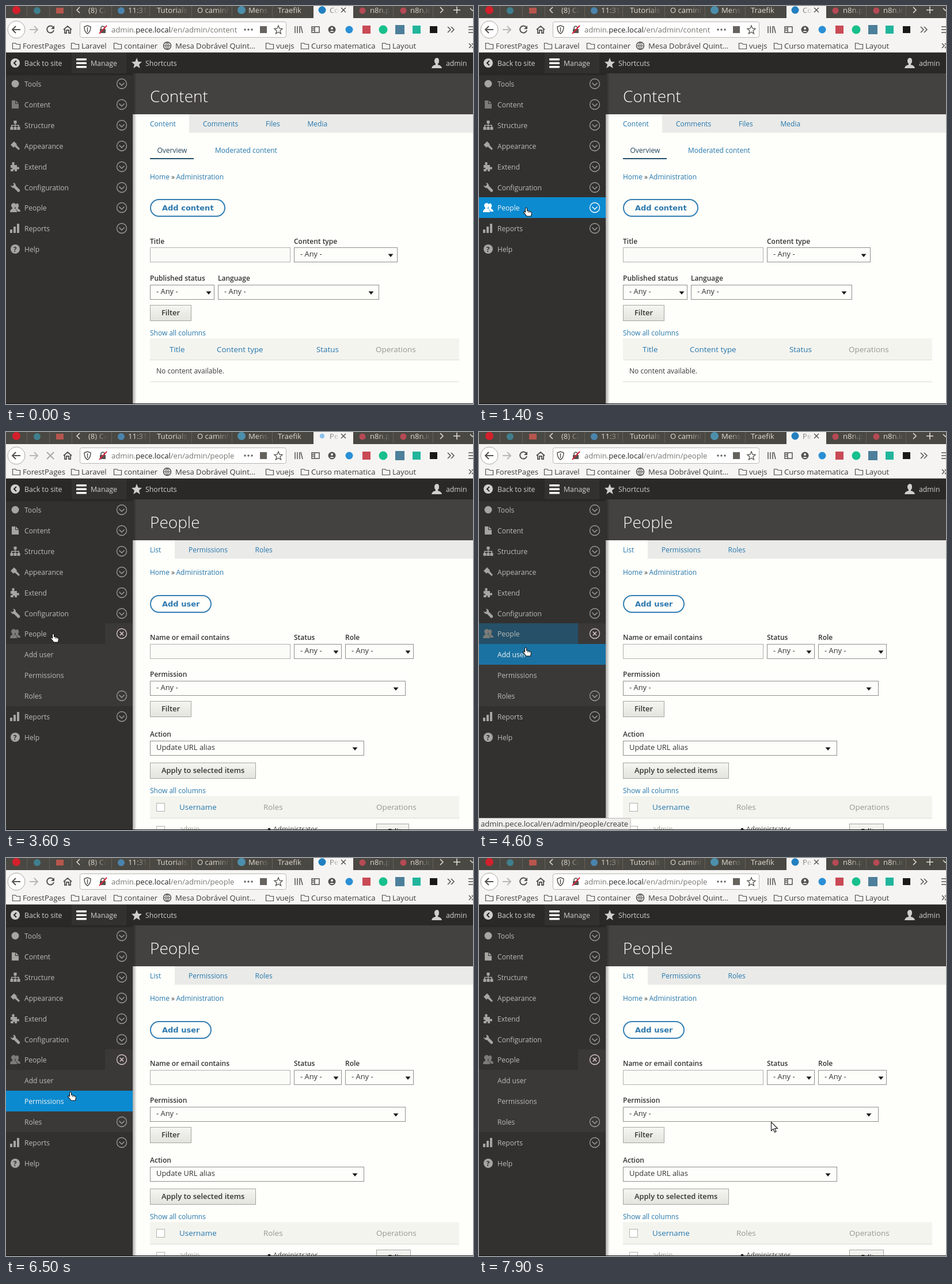
Animation, 811 px wide and 691 px high, one loop 8000 ms. Source, as an HTML page:

```html
<!DOCTYPE html>
<html lang="en">
<head>
<meta charset="utf-8">
<title>Admin menu walk-through</title>
<style>
html, body { margin: 0; width: 100%; height: 100%; overflow: hidden; background: #fefefa; }
svg { display: block; width: 811px; height: 691px; }
text { font: 12px "Open Sans", "Noto Sans", sans-serif; fill: #3a3a38; white-space: pre; }
.ui { font-size: 13.1px; fill: #3d3c39; }
.tab { font-size: 13.1px; fill: #dfdbd2; }
.bar { font-size: 12.3px; fill: #d0d0cc; }
.h1 { font-size: 28px; font-weight: 300; fill: #fff; }
.link { fill: #2577ad; }
.now { fill: #21445c; }
.label { font-weight: 600; fill: #333331; }
.btn { font-size: 12.9px; font-weight: 600; fill: #333331; }
.opt { font-size: 12.9px; fill: #333331; }
.th { font-size: 13.4px; }
.dim { fill: #969692; }
.pill { font: bold 13px "DejaVu Sans", sans-serif; fill: #2c78af; }
.row text { font-size: 12.1px; fill: #bbbbb7; }
.row .ico { color: #a5a5a1; }
.row .ico.here { color: #7b7b78; }
.row .arrow { color: #9c9c98; }
.row.hot .ico, .row.hot .arrow { color: #fff; }
.row.hot text { fill: #f4f4f2; }
.line { fill: none; stroke: currentColor; stroke-width: 1.5; }
.nav { color: #55534f; }
</style>
</head>
<body>
<svg id="stage" viewBox="0 0 811 691" xmlns="http://www.w3.org/2000/svg"></svg>
<script>
const LOOP = 8000, STEP = 100;
const MENU_TOP = 117, ROW = 35.9;
const stage = document.getElementById('stage');

// Markup helpers
const text = (x, y, s, cls = '') => `<text x="${x}" y="${y}" class="${cls}">${s}</text>`;
const rect = (x, y, w, h, fill, more = '') => `<rect x="${x}" y="${y}" width="${w}" height="${h}" fill="${fill}" ${more}/>`;
const dot = (x, y, r, fill, more = '') => `<circle cx="${x}" cy="${y}" r="${r}" fill="${fill}" ${more}/>`;
const line = (d, more = '') => `<path class="line" d="${d}" ${more}/>`;
const shape = (d, fill = 'currentColor', more = '') => `<path d="${d}" fill="${fill}" ${more}/>`;
const at = (x, y, s, more = '') => `<g transform="translate(${x} ${y})" ${more}>${s}</g>`;
const frame = (x, y, w, h, fill, stroke, more = '') =>
  rect(x + .5, y + .5, w - 1, h - 1, fill, `stroke="${stroke}" ${more}`);

// Form parts
const field = (x, y, w) => frame(x, y, w, 26, '#fbfbf7', '#b1b1ac');
const select = (x, y, w, tip, s = '- Any -') => frame(x, y, w, 26, '#fdfdf9', '#8f8f8b') +
  text(x + 11, y + 16, s, 'opt') + shape(`M${tip - 4.5} ${y + 11.5}h9l-4.5 5.5z`, '#1b1b1a');
const button = (x, y, w, s) => frame(x, y, w, 28, 'url(#btn)', '#a5a5a0') + text(x + 20, y + 18, s, 'btn');
const pill = (y, w, s) => rect(251, y + 1, w - 2, 29, '#fefefa', 'rx="14.5" stroke="#347fb4" stroke-width="2"') +
  text(271, y + 20, s, 'pill');
const box = (x, y) => frame(x, y, 15, 15, '#fff', '#b1b1ac');
const crumbs = y => text(250, y, 'Home', 'link') + text(287, y, '»') + text(295.5, y, 'Administration', 'link');
const header = (title, tabEnd, tabs) =>
  rect(220, MENU_TOP, 591, 71, '#444240') + text(250, 167, title, 'h1') +
  rect(tabEnd, 188, 811 - tabEnd, 32, '#eaeae8') +
  tabs.map(([x, s]) => text(x, 209, s, 'link')).join('');

// Sidebar icons, centred on 0,0
const icons = {
  Tools: dot(0, 0, 6.5, 'currentColor'),
  Content: shape('M-6-7h6v6h6v8h-12zM1-7l5 5h-5z'),
  Structure: shape('M-2.5-8h5v5h-1.8v2.5h6.3v3.5h1.5v5h-5v-5h1.8v-2h-4.6v2h1.8v5h-5v-5h1.8v-2h-4.6v2h1.8v5h-5v-5h1.5v-3.5h6.3v-2.5h-1.8z'),
  Appearance: shape('M-8-2l6-6 5 5-1 1 6 7-2 2-7-6-2 2z'),
  Extend: shape('M-8-3h3q-2-5 1.5-5t1.5 5h5v4q4-2 4 1.5t-4 1.5v4h-4q1-3-1-3t-1 3h-5v-4q3 1 3-1t-3-1z'),
  Configuration: shape('M-4-8q5 0 5 5l7 7q1 4-3 4l-7-7q-5 0-6-5l3 2 3-3z'),
  People: shape('M2-7q3-1 4 2t-1 5v2q4 1 4 5h-5q-1-4-4-5 2-4 0-7zM-3-8q4 0 4 4t-2 4v2q4 1 4 6h-12q0-5 4-6v-2q-2-1-2-4t4-4z'),
  Reports: shape('M-9 2h4v6h-4zM-3-3h4v11h-4zM3-8h4v16h-4z'),
  Help: dot(0, 0, 8, 'currentColor') + '<text x="-3.3" y="4.5" style="font-weight:700;fill:#333130">?</text>'
};
const ring = '<circle class="line" r="8.5" style="stroke-width:1.3"/>';
const chevron = ring + line('M-4.5-1.5L0 3 4.5-1.5');
const cross = ring + line('M-3.2-3.2L3.2 3.2M3.2-3.2L-3.2 3.2');

function menuRow(page, name, i, current) {
  const open = page === 2 && name === 'People';
  const y = Math.round(MENU_TOP + ROW * i), mid = y + 18;
  const arrow = open ? cross : /Help|Add user|Permissions/.test(name) ? '' : chevron;
  return `<g class="row" data-key="${page}${name}">` +
    (open ? rect(172, y, 48, 36, '#3b3938', 'rx="3"') : '') +
    rect(0, y, open ? 172 : 220, 36, '#0c8bd1', 'class="glow" opacity="0"') +
    (icons[name] ? at(16, mid, icons[name], `class="ico ${name === current ? 'here' : ''}"`) : '') +
    text(32, mid + 5, name) +
    at(201, mid, arrow, open ? 'style="color:#dccbc9"' : 'class="arrow"') + '</g>';
}
function sidebar(page, current, names) {
  return rect(0, MENU_TOP, 220, 573, '#333130') + rect(220, MENU_TOP, 7, 573, 'url(#side)') +
    (page === 2 ? rect(0, 368, 220, 108, '#3b3938') : '') +
    names.map((n, i) => menuRow(page, n, i, current)).join('') +
    rect(0, MENU_TOP, 220, 5, 'url(#drop)');
}

const mainItems = ['Tools', 'Content', 'Structure', 'Appearance', 'Extend', 'Configuration', 'People'];

const contentPage = header('Content', 318, [[250, 'Content'], [342, 'Comments'], [451, 'Files'], [523.5, 'Media']]) +
  text(262.5, 255, 'Overview', 'now') + rect(250, 264, 76, 2, '#23506c') +
  text(363, 255, 'Moderated content', 'link') + crumbs(301) + pill(335, 131, 'Add content') +
  text(250, 413, 'Title', 'label') + text(500, 413, 'Content type', 'label') +
  field(250, 419, 244) + select(500, 419, 180, 668) +
  text(250, 477, 'Published status', 'label') + text(368, 477, 'Language', 'label') +
  select(250, 484, 112, 352) + select(368, 484, 280, 634) + button(250, 519, 72, 'Filter') +
  text(250, 572, 'Show all columns', 'link') +
  rect(250, 577, 537, 37, '#f4f4ef') + rect(250, 614, 537, 1, '#dcdcd7') +
  text(284, 601, 'Title', 'th link') + text(366, 601, 'Content type', 'th link') +
  text(539, 601, 'Status', 'th link') + text(642, 601, 'Operations', 'th dim') +
  text(261, 638, 'No content available.') + rect(250, 652, 537, 1, '#dcdcd7') +
  sidebar(1, 'Content', [...mainItems, 'Reports', 'Help']);

const peoplePage = header('People', 293, [[250, 'List'], [317, 'Permissions'], [432.5, 'Roles']]) +
  crumbs(248) + pill(283, 107, 'Add user') +
  text(250, 361, 'Name or email contains', 'label') + text(500, 361, 'Status', 'label') + text(589, 361, 'Role', 'label') +
  field(250, 368, 244) + select(500, 368, 83, 573) + select(589, 368, 119, 698) +
  text(250, 425, 'Permission', 'label') + select(250, 432, 444, 677) + button(250, 467, 72, 'Filter') +
  text(250, 529, 'Action', 'label') + select(250, 536, 372, 606, 'Update URL alias') +
  button(250, 574, 184, 'Apply to selected items') + text(250, 627, 'Show all columns', 'link') +
  rect(250, 632, 537, 38, '#f4f4ef') + rect(250, 670, 537, 1, '#dcdcd7') + box(261, 644) +
  text(301, 656, 'Username', 'th link') + text(447, 656, 'Roles', 'th dim') + text(643, 656, 'Operations', 'th dim') +
  box(261, 684) + text(301, 694, 'admin', 'dim') + dot(457, 690, 2.5, '#222') + text(464, 694, 'Administrator') +
  `<g id="editNarrow">${button(643, 680, 57, 'Edit')}</g><g id="editWide">${button(643, 680, 60, 'Edit')}</g>` +
  sidebar(2, 'People', [...mainItems, 'Add user', 'Permissions', 'Roles', 'Reports', 'Help']);

// Browser window
const tabText = (x, end, s) => text(x, 12, s, 'tab') +
  rect(end - 22, 0, 22, 21, 'url(#fade)') + rect(end, 0, 600, 21, '#4a4842');
const tabStrip = rect(0, 0, 811, 21, '#4a4842') +
  tabText(143, 175, '(8) Cana') + tabText(212, 246, '11:31') + tabText(262, 317, 'Tutorials') +
  tabText(332, 388, 'O caminho') + tabText(421, 457, 'Mensa') + tabText(472, 530, 'Traefik') +
  tabText(632, 667, 'n8n.pe') + tabText(702, 738, 'n8n.io') +
  [36, 75, 114, 183, 249, 322, 392, 462, 672, 741].map(x => rect(x, 0, 1, 19, '#64615a')).join('') +
  dot(18, 7, 7, '#d4202c') + dot(54, 8, 6, '#3f7f8e') + rect(87, 3, 13, 10, '#b6564d') +
  dot(200, 8, 6, '#4a84ad') + dot(409, 7, 7, '#4c8fac') + dot(619, 8, 5.5, '#b64a55') + dot(690, 8, 5.5, '#b64a55') +
  `<g style="color:#e4e1da">${line('M128 2l-5 5 5 5M754 2l5 5-5 5M777 7h12M783 1v12M806 4l4 4 4-4')}</g>` +
  rect(534, 0, 69, 22, '#f5f4f2') +
  dot(549, 7, 6.5, '#217fbf', 'id="favicon"') + dot(549, 7, 4.2, '#8cc2ec', 'id="loader"') +
  '<text id="tabName" x="562" y="12" class="ui"></text>' + rect(562, 0, 18, 20, 'url(#fadeLight)') +
  `<g class="nav">${line('M582 3l8 8M590 3l-8 8')}</g>`;

const folder = x => line(`M${x + .5} 64.5h5l2 2h6v8h-13z`, 'style="stroke-width:1.2"');
const bookmarks = [[11, 29, 'ForestPages'], [113, 131, 'Laravel'], [187, 205, 'container'], [0, 294, 'Mesa Dobrável Quint…'],
  [451, 469, 'vuejs'], [512, 530, 'Curso matematica'], [653, 671, 'Layout']]
  .map(([icon, x, s]) => (icon ? folder(icon) : '') + text(x, 74, s, 'ui')).join('');

const chrome = tabStrip + rect(0, 21, 811, 59, '#f5f4f2') + rect(0, 80, 811, 1, '#b5b2ac') +
  `<g class="nav">${dot(18, 41, 15, '#fff', 'stroke="#aaa7a1"')}` +
  line('M25 41h-14m6-6l-6 6 6 6', 'style="stroke-width:2"') +
  line('M41 41h14m-6-6l6 6-6 6', 'style="stroke-width:2;stroke:#b9b7b2"') +
  `<g id="reload">${line('M82 37a6 6 0 1 0 1 5', 'style="stroke-width:2"') + shape('M84 34v6h-6z')}</g>` +
  `<g id="stop">${line('M71 35l12 12M83 35l-12 12', 'style="stroke:#aaa8a3;stroke-width:2"')}</g>` +
  line('M100 41l7-6 7 6M102 40v7h3v-5h4v5h3v-7', 'style="stroke-width:1.8"') +
  frame(128, 27, 359, 28, '#fff', '#b9b6b0', 'rx="3"') +
  line('M136 36l5.5-2 5.5 2q0 9-5.5 12-5.5-3-5.5-12zM141.5 37v8') +
  shape('M163 40h10v7h-10z') + line('M165 40v-3q3-4 6 0v3') + line('M162 48l13-14', 'style="stroke:#d7263d;stroke-width:2"') +
  '<text x="183" y="46" class="ui" style="fill:#777571">admin.<tspan fill="#22211f">pece.local</tspan>/en/admin/<tspan id="path"></tspan></text>' +
  [415, 421, 427].map(x => dot(x, 41, 1.7, '#66635f')).join('') + rect(441, 35, 12, 12, '#66635f') +
  line('M473 34l2 5 5 .5-4 3.5 1.5 5-4.5-2.7-4.5 2.7 1.5-5-4-3.5 5-.5z', 'style="stroke-width:1.3"') +
  line('M502 35v12M506 35v12M510 35v12M512 35l3 12') +
  line('M531 36h13v10h-13zM536 36v10M532 39h3M532 42h3') + dot(566, 41, 6.5, '#55534f') + dot(566, 39, 2, '#f5f4f2') +
  shape('M562 45q4-4 8 0z', '#f5f4f2') +
  line('M767 36l5 5-5 5M773 36l5 5-5 5M803 36h9M803 41h9M803 46h9M804 65l4 4-4 4M809 65l4 4-4 4') +
  bookmarks + '<circle class="line" cx="280" cy="69" r="6.5"/>' +
  line('M273 69h14M280 62v14M280 62q-6 7 0 14q6-7 0-14', 'style="stroke-width:1"') + '</g>' +
  dot(596, 41, 6.5, '#2a8fd6') + rect(619, 34, 14, 14, '#c94a55') + dot(655, 41, 7.5, '#17c08c') +
  rect(676, 33, 16, 16, '#4d7f9b') + rect(706, 34, 14, 14, '#21b59c') + rect(736, 35, 13, 12, '#191918');

const toolbar = rect(0, 81, 811, 36, '#2a2928') + rect(114, 81, 95, 36, '#333130') +
  dot(16, 99, 8, '#cfcfcb') + line('M18 95l-4 4 4 4', 'style="color:#2a2928;stroke-width:2"') +
  text(32, 104, 'Back to site', 'bar') +
  [91, 97.5, 104].map(y => rect(122, y, 18, 3.5, '#fff', 'rx="1"')).join('') + text(147, 104, 'Manage', 'bar') +
  shape('M227 90l2.5 6.5 6.5.5-5 4.5 1.8 6.5-5.8-3.8-5.8 3.8 1.8-6.5-5-4.5 6.5-.5z', '#cfcfcb') +
  text(242, 104, 'Shortcuts', 'bar') +
  shape('M748 90q4 0 4 5t-2 5v2q6 1 7 6h-18q1-5 7-6v-2q-2-1-2-5t4-5z', '#cfcfcb') + text(764, 104, 'admin', 'bar');

const gradient = (id, stops, vertical) => `<linearGradient id="${id}" ${vertical ? 'x2="0" y2="1"' : ''}>` +
  stops.map(([color, alpha], i) => `<stop offset="${i}" stop-color="${color}" stop-opacity="${alpha}"/>`).join('') + '</linearGradient>';

const hand = shape('M-1.5 1.5q1.5-2.5 3 0v4l2 .2 2 .8 2 .7q2 .5 2 2.5l-1 5.3h-7.5l-3-4-2.5-2.5q0-2 2-1.5l1 1z', '#fff', 'stroke="#111" stroke-width="1.1"') +
  line('M3.5 7v2M6 7.5v2', 'style="stroke:#111;stroke-width:.8"');
const arrow = shape('M.5.5v15l3.5-3 2.5 5.5 2.5-1-2.5-5.5h5z', '#fff', 'stroke="#111" stroke-width="1.1"');

stage.innerHTML = '<defs>' +
  gradient('btn', [['#f5f5f1', 1], ['#e4e4de', 1]], true) + gradient('side', [['#000', .33], ['#000', 0]]) +
  gradient('drop', [['#000', .3], ['#000', 0]], true) + gradient('fade', [['#4a4842', 0], ['#4a4842', 1]]) +
  gradient('fadeLight', [['#f5f4f2', .25], ['#f5f4f2', 1]]) + '</defs>' +
  rect(0, 0, 811, 691, '#fefefa') +
  `<g id="page1">${contentPage}</g><g id="page2">${peoplePage}</g>` + chrome + toolbar +
  rect(0, 690, 811, 1, '#151514') +
  '<g id="status"><rect id="statusBox" x="-1" y="670.5" height="19.5" rx="2" fill="#efeeec" stroke="#b9b7b2"/><text id="statusText" x="3" y="685" class="ui"></text></g>' +
  `<g id="cursor"><g id="hand">${hand}</g><g id="arrow">${arrow}</g></g>`;

// Timeline: pointer stops [ms, x, y], hovered rows, link previews
const pointer = [[500, 70, 45], [600, 77, 162], [700, 79, 187], [800, 80, 226], [900, 80, 262], [1000, 81, 284],
  [1100, 81, 305], [1200, 82, 328], [1300, 82, 344], [1400, 82, 350], [4500, 82, 362], [4600, 81, 374], [4700, 82, 380],
  [5000, 86, 386], [5100, 94, 394], [5200, 105, 410], [5300, 150, 412], [5400, 230, 405], [5600, 150, 412],
  [5700, 344, 390], [5800, 264, 395], [6000, 224, 395], [6200, 380, 475], [6300, 369, 440], [6500, 112, 406],
  [6700, 116, 413], [7000, 125, 422], [7200, 140, 428], [7400, 240, 400], [7500, 430, 440], [7600, 504, 475],
  [7700, 271, 444], [7900, 507, 458]];
const hovers = [['1Content', 501, 640], ['1Structure', 700, 790], ['1Appearance', 701, 890], ['1Extend', 801, 1010],
  ['1Configuration', 1001, 1160], ['1People', 1150, 3600], ['2People', 4401, 4535], ['2Add user', 4530, 5140],
  ['2Permissions', 5101, 5340], ['2Permissions', 5501, 5640], ['2Permissions', 6401, 7340]];
const site = 'admin.pece.local', base = site + '/en/admin/';
const previews = [[1200, 1400, base + 'config'], [1900, 2800, base + 'people'], [2800, 3600, `Waiting for ${site}…`],
  [4600, 5100, base + 'people/create'], [5100, 5400, base + 'people/permissions'],
  [5600, 5700, base + 'people/permissions'], [6700, 7200, base + 'people/permissions']];

const el = id => document.getElementById(id);
const show = (id, on) => { el(id).style.display = on ? '' : 'none'; };
const clamp = v => Math.max(0, Math.min(1, v));
const rows = [...stage.querySelectorAll('.row')];

function render(ms) {
  const t = Math.floor(ms / STEP) * STEP;
  const loaded = t >= 3600, loading = t >= 2800 && t < 4100;
  show('page1', !loaded);
  show('page2', loaded);
  show('editNarrow', loading);
  show('editWide', !loading);
  show('stop', loading);
  show('reload', !loading);
  el('reload').style.opacity = t >= 4100 && t < 4300 ? .4 : 1;
  show('favicon', !loading);
  show('loader', loading);
  el('loader').setAttribute('cx', 549 + 4.5 * Math.sin((t - 3600) / 160));
  el('path').textContent = loaded ? 'people' : 'content';
  el('tabName').textContent = loaded ? 'Pe' : 'Co';

  for (const row of rows) {
    let level = 0, hot = false;
    for (const [key, from, to] of hovers) {
      if (key !== row.dataset.key) continue;
      level = Math.max(level, clamp(Math.min((t - from) / 100, 1 - (t - to) / 100)));
      hot = hot || (t >= from && t < to);
    }
    row.querySelector('.glow').setAttribute('opacity', level);
    row.classList.toggle('hot', hot);
  }

  const preview = previews.find(([from, to]) => t >= from && t < to);
  show('status', preview);
  if (preview) {
    el('statusText').textContent = preview[2];
    el('statusBox').setAttribute('width', el('statusText').getComputedTextLength() + 8);
  }

  const stop = pointer.filter(p => p[0] <= t).pop();
  show('cursor', stop);
  if (stop) {
    const [, x, y] = stop, overMenu = x < 220 && y > MENU_TOP;
    el('cursor').setAttribute('transform', `translate(${x} ${y})`);
    show('hand', overMenu);
    show('arrow', !overMenu);
  }
}

const start = performance.now();
(function tick() {
  render((performance.now() - start) % LOOP);
  requestAnimationFrame(tick);
})();
</script>
</body>
</html>
```
